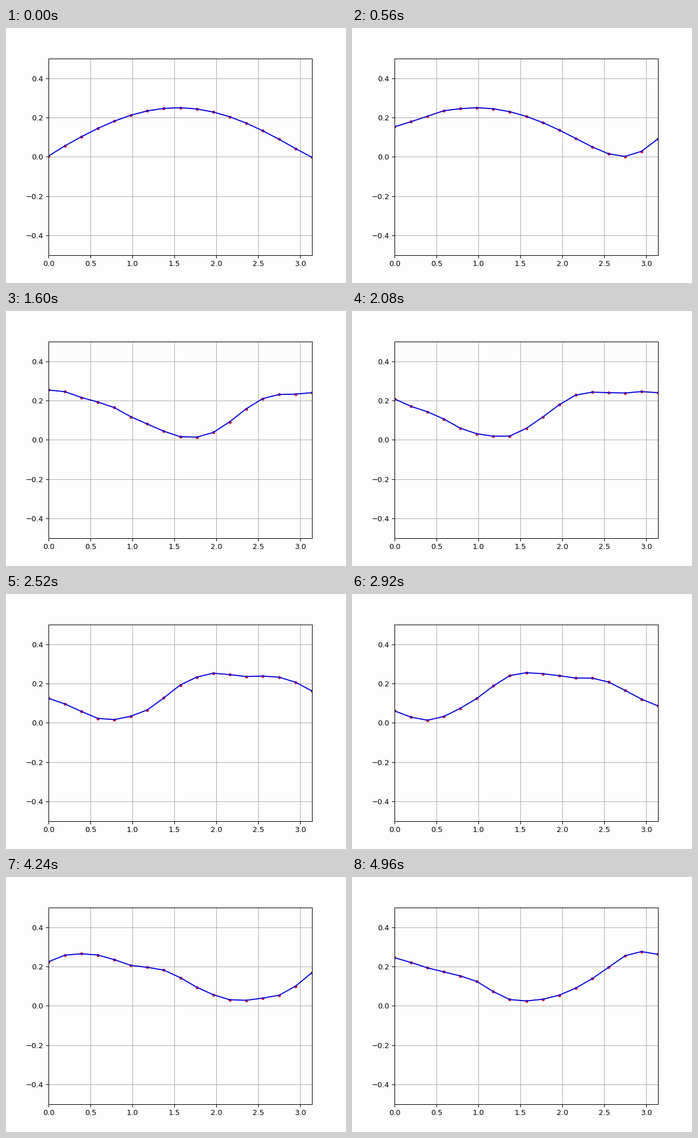
Recreate the animation shown at these times as a matplotlib script. Size 600 by 450 pixels, loop 5 s.

```python
import numpy as np
import matplotlib.pyplot as plt
from matplotlib.animation import FuncAnimation

FRAMES, INTERVAL = 125, 40
POINTS = 17
STEP, START = 0.2103, 0.147  # travel in grid cells: per frame, at first frame
PAPER, BLUE, RED = "#fefdfe", "#0404dc", "#dc0424"

x = np.linspace(0, np.pi, POINTS)
spectrum = np.fft.rfft(np.sin(x) / 4)
# central differences on a periodic grid carry each mode at its own speed
speed = np.sin(2 * np.pi * np.arange(len(spectrum)) / POINTS)


def wave(frame):
    travel = START + STEP * frame
    return np.fft.irfft(spectrum * np.exp(1j * travel * speed), POINTS)


plt.rcParams["font.family"] = "DejaVu Sans"
# 600 x 450 pixels
fig, ax = plt.subplots(figsize=(6.4, 4.8), dpi=93.75, facecolor=PAPER)
ax.set_facecolor(PAPER)
ax.set_xlim(0, np.pi)
ax.set_ylim(-0.5, 0.5)
ax.grid(True)
dots, = ax.plot(x, wave(0), ".", color=RED)
line, = ax.plot(x, wave(0), "-", color=BLUE)


def update(frame):
    y = wave(frame)
    dots.set_ydata(y)
    line.set_ydata(y)
    return dots, line


anim = FuncAnimation(fig, update, frames=FRAMES, interval=INTERVAL,
                     repeat=True, repeat_delay=0)
plt.show()
```
